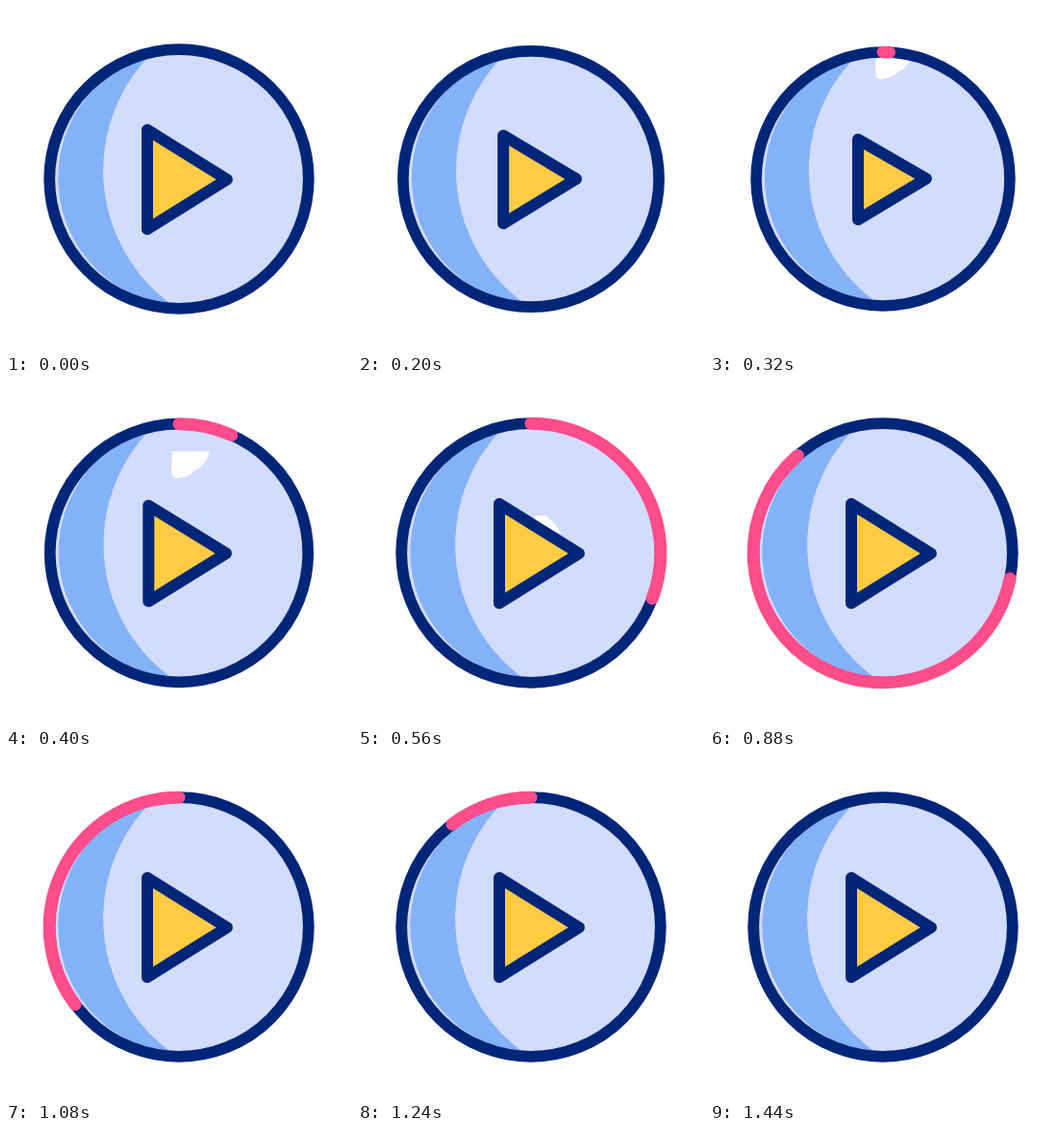
These frames come from a looping animation (360 px wide and 360 px high, 1.48 s). An HTML page:

```html
<!DOCTYPE html>
<html lang="en">
<head>
<meta charset="utf-8">
<title>Play button</title>
<style>
  html, body { margin: 0; height: 100%; overflow: hidden; background: #fff; }
  svg { display: block; width: 100vw; height: 100vh; }
</style>
</head>
<body>
<svg viewBox="0 0 360 360" stroke-linecap="round" stroke-linejoin="round">
  <clipPath id="disc"><circle cx="180" cy="180" r="134"/></clipPath>
  <g id="button">
    <circle cx="180" cy="180" r="134" fill="#d2dcfd"/>
    <g clip-path="url(#disc)">
      <path id="drop" fill="#fff" d="M173 46L212 46Q209 60 197 66Q187 74 177 74Q171 73 172 63Z"/>
      <path id="splash" fill="#fff" d="M155 122Q169 120 172 114Q168 103 173 94Q182 85 175 79Q167 74 172 65Q180 61 178 55Q185 40 230 44Q282 70 314 138Q299 127 279 130Q264 132 257 140Q237 154 236 178L157 180Z"/>
      <ellipse id="hole" rx="20" ry="9.5" fill="#d2dcfd"/>
      <path fill="#84b2f8" d="M151 50A172 172 0 0 0 174.5 312A134 134 0 0 1 151 50Z"/>
    </g>
    <circle cx="180" cy="180" r="134.8" fill="none" stroke="#00267a" stroke-width="11.8"/>
    <path id="arc" fill="none" stroke="#ff4c8b" stroke-width="13"/>
  </g>
  <path id="triangle" fill="#ffcb43" stroke="#00267a" stroke-width="12"/>
</svg>
<script>
const LOOP = 1480, STEP = 40, RADIUS = 134.8;
const el = id => document.getElementById(id);
const set = (id, name, value) => el(id).setAttribute(name, value);
const show = (id, on) => set(id, 'visibility', on ? 'visible' : 'hidden');
const progress = (t, from, to) => Math.min(1, Math.max(0, (t - from) / (to - from)));
const ease = (t, from, to) => {
  const x = progress(t, from, to);
  return x * x * (3 - 2 * x);
};
const scaleAt = (x, y, s) => `translate(${x} ${y}) scale(${s}) translate(${-x} ${-y})`;

function rimPoint(turn) {
  const a = turn * 2 * Math.PI;
  return `${180 + RADIUS * Math.sin(a)} ${180 - RADIUS * Math.cos(a)}`;
}

function drawArc(start, end) {
  show('arc', end - start > 0.0005);
  const mid = (start + end) / 2;
  const sweep = `A${RADIUS} ${RADIUS} 0 0 1 `;
  set('arc', 'd', `M${rimPoint(start)}${sweep}${rimPoint(mid)}${sweep}${rimPoint(end)}`);
}

function draw(t) {
  const press = ease(t, 120, 280) - ease(t, 280, 440);
  set('button', 'transform', scaleAt(180, 180, 1 - 0.025 * press));
  const left = 147 + 8.3 * press, half = 51.7 - 11.8 * press;
  set('triangle', 'd', `M${left} ${180.5 - half}V${180.5 + half}L${230 - 6 * press} ${180.5 - press}Z`);

  drawArc(ease(t, 600, 1400), ease(t, 280, 1040));

  // A drop falls behind the triangle, then splashes and dissolves.
  show('drop', t >= 320 && t < 520);
  set('drop', 'transform', `translate(0 ${110 * progress(t, 320, 520) ** 1.5})`);
  show('splash', t > 520 && t < 840);
  set('splash', 'transform', scaleAt(185, 165, Math.max(0, t - 520) / 200));
  const gap = Math.max(0, t - 640) / 80;
  show('hole', gap > 0 && t < 840);
  set('hole', 'transform', `translate(238 96) rotate(25) scale(${gap ** 3})`);
}

function tick() {
  const t = performance.now() % LOOP;
  draw(Math.floor(t / STEP) * STEP);
  requestAnimationFrame(tick);
}
tick();
</script>
</body>
</html>
```
